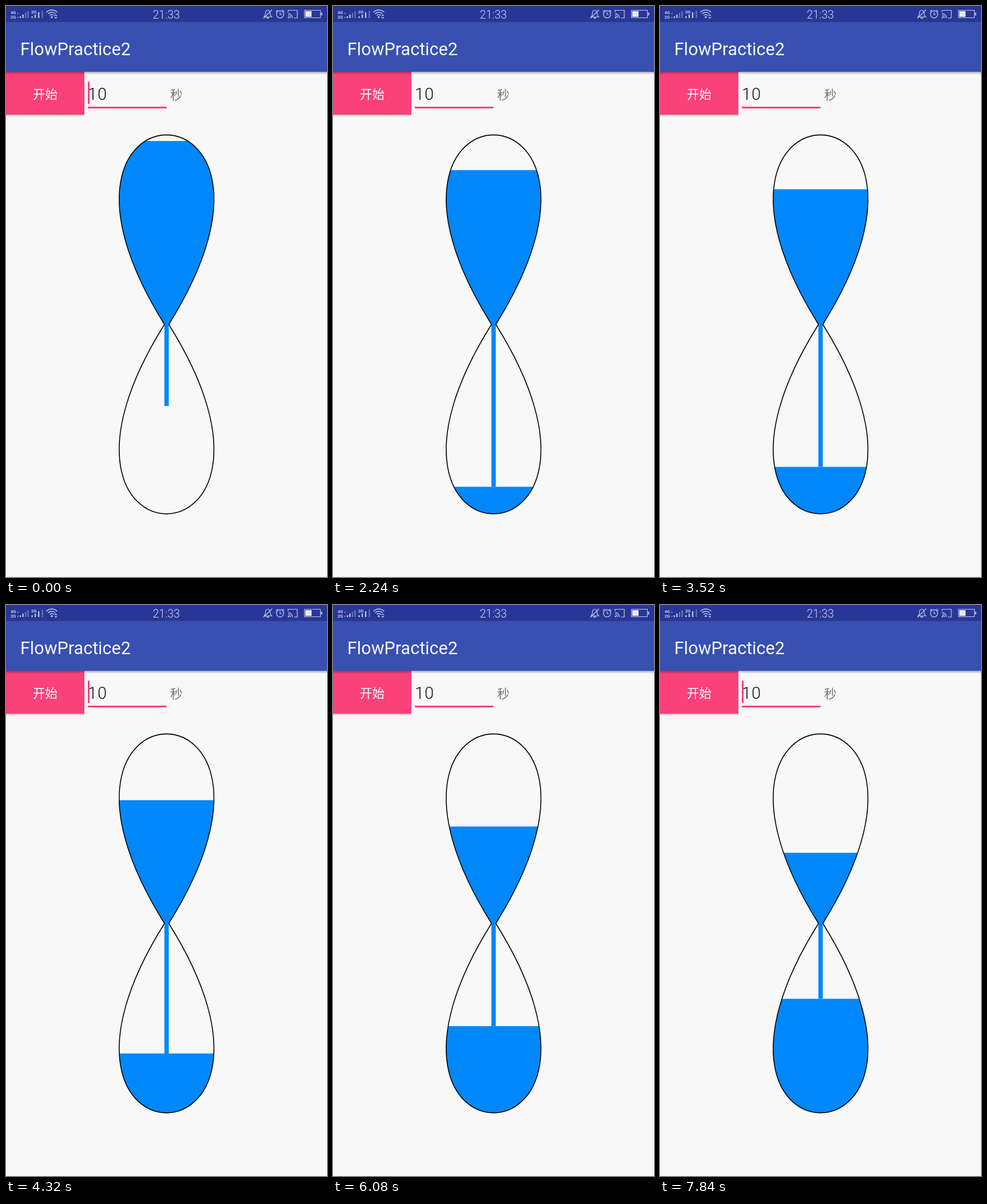
These frames come from a looping animation (561 by 998 pixels, 8 s). An HTML page with a canvas:

```html
<!DOCTYPE html>
<html lang="zh">
<head>
<meta charset="utf-8">
<title>Hourglass</title>
<style>
  html, body { margin: 0; width: 100%; height: 100%; overflow: hidden; background: #f8f8f8; }
  canvas { display: block; width: 561px; height: 998px; }
</style>
</head>
<body>
<canvas id="stage" width="561" height="998"></canvas>
<script>
const ctx = document.getElementById('stage').getContext('2d');
const W = 561, H = 998, LOOP = 8000, STEP = 160;
const TOP = 225.5, NECK = 556.5, FLOOR = 887.5;
const LEFT = 277, RIGHT = 284.5;
const BLUE = '#0088fb', PINK = '#fa417a', ICON = '#c3cae8', DIM = '#6b78ba';
const LATIN = 'Roboto, "Open Sans", sans-serif';
const HAN = '"Noto Sans CJK SC", "Noto Sans CJK", "Noto Sans CJK JP", sans-serif';

function box(x, y, w, h, color) {
  ctx.fillStyle = color;
  ctx.fillRect(x, y, w, h);
}

function text(str, x, y, font, color, spacing = 0) {
  ctx.font = font;
  ctx.fillStyle = color;
  ctx.letterSpacing = spacing + 'px';
  ctx.fillText(str, x, y);
}

function line(points, color = ICON, width = 1.2) {
  ctx.beginPath();
  points.forEach(([x, y]) => ctx.lineTo(x, y));
  ctx.strokeStyle = color;
  ctx.lineWidth = width;
  ctx.stroke();
}

function arc(x, y, r, from, to, width = 1.3) {
  ctx.beginPath();
  ctx.arc(x, y, r, from * Math.PI, to * Math.PI);
  ctx.strokeStyle = ICON;
  ctx.lineWidth = width;
  ctx.stroke();
}

function dot(x, y, r) {
  ctx.beginPath();
  ctx.arc(x, y, r, 0, 2 * Math.PI);
  ctx.fillStyle = ICON;
  ctx.fill();
}

function shade(y, h, w, alpha) {
  const g = ctx.createLinearGradient(0, y, 0, y + h);
  g.addColorStop(0, `rgba(0,0,0,${alpha})`);
  g.addColorStop(1, 'rgba(0,0,0,0)');
  box(0, y, w, h, g);
}

function bars(x, lit) {
  for (let i = 0; i < 4; i++) {
    const h = 3 + i * 3;
    box(x + i * 4.5, 21 - h, 2.2, h, i < lit ? ICON : DIM);
  }
}

function statusBar() {
  box(0, 0, W, 28, '#283796');
  text('4G', 8, 14, `bold 7.5px ${LATIN}`, ICON);
  text('2G', 8, 21.5, `bold 7.5px ${LATIN}`, ICON);
  box(20, 12, 1.5, 1.5, ICON);
  box(20, 19, 1.5, 1.5, ICON);
  bars(24, 2);
  text('2G', 44, 12.5, `bold 7.5px ${LATIN}`, ICON);
  box(44.5, 18, 2.2, 3, ICON);
  box(50, 15, 2.2, 6, ICON);
  box(56, 11, 2.2, 10, ICON);
  box(62.5, 8, 2, 13, DIM);

  // Wi-Fi
  arc(80, 20, 13, 1.24, 1.76, 1.5);
  arc(80, 20, 9, 1.24, 1.76, 1.5);
  arc(80, 20, 5, 1.24, 1.76, 1.5);
  dot(80, 19.5, 1.7);
  line([[85, 17.5], [87, 15.5], [89, 17.5]]);
  line([[85, 19.5], [87, 21.5], [89, 19.5]]);

  text('21:33', 256.5, 21.5, `300 19.5px ${LATIN}`, '#cfd4ee');

  // Muted bell
  ctx.beginPath();
  ctx.moveTo(451, 19);
  ctx.quadraticCurveTo(453.5, 17, 453.5, 12);
  ctx.bezierCurveTo(454, 6, 461, 6, 461.5, 12);
  ctx.quadraticCurveTo(461.5, 17, 464.5, 19);
  ctx.closePath();
  ctx.strokeStyle = ICON;
  ctx.lineWidth = 1.2;
  ctx.stroke();
  arc(457.5, 19.5, 2, 0, 1);
  line([[450, 21.5], [465, 6.5]]);

  // Alarm
  arc(479, 14.5, 6.3, 0, 2);
  line([[479, 10.5], [479, 15], [482, 15]]);
  line([[471.5, 10], [475, 7]]);
  line([[483, 7], [486.5, 10]]);

  // Cast
  line([[493, 11], [493, 7.5], [509, 7.5], [509, 21], [503, 21]]);
  arc(493, 21, 7.5, 1.5, 2);
  arc(493, 21, 4.2, 1.5, 2);
  dot(493.8, 20.2, 1.3);

  // Battery
  ctx.strokeStyle = ICON;
  ctx.lineWidth = 1;
  ctx.strokeRect(521.5, 7.5, 28, 13);
  box(523, 9, 11, 10, '#e4e7f5');
  box(550.5, 11.5, 2, 5, ICON);
}

function controls(cursorOn) {
  box(0, 115, 137, 75, PINK);
  shade(190, 4, 137, 0.22);
  shade(115, 5, W, 0.3);
  box(0, 28, W, 87, '#3850b0');
  text('FlowPractice2', 25, 85.5, `30.5px ${LATIN}`, '#f6f7fb');
  text('开始', 47, 162, `21.5px ${HAN}`, '#fff');
  text('10', 143, 164, `300 29px ${LATIN}`, '#111', 1);
  text('秒', 287, 163, `21.5px ${HAN}`, '#737373');
  box(143, 176, 137.5, 3, PINK);
  if (cursorOn) box(143, 132.5, 3, 38.5, PINK);
}

function bulb(controlY) {
  const path = new Path2D();
  path.moveTo(LEFT, NECK);
  path.bezierCurveTo(0, controlY, W, controlY, RIGHT, NECK);
  return path;
}

const upper = bulb(115), lower = bulb(998);

function fillBulb(path, from, to) {
  ctx.save();
  ctx.clip(path);
  box(0, from, W, to - from, BLUE);
  ctx.restore();
}

function hourglass(run) {
  const fall = Math.min(1, run / 483);
  const topLevel = TOP + run * 0.0331;
  const lowLevel = FLOOR - Math.max(0, run - 483) * 0.0344;
  const streamEnd = Math.min(lowLevel, NECK + (FLOOR - NECK) * fall * fall);

  fillBulb(upper, topLevel, NECK);
  fillBulb(lower, lowLevel, FLOOR + 1);
  box(LEFT - 0.2, NECK - 1, RIGHT - LEFT + 0.2, streamEnd - NECK + 1, BLUE);
  ctx.strokeStyle = '#000';
  ctx.lineWidth = 1.6;
  ctx.stroke(upper);
  ctx.stroke(lower);
}

// Timer milliseconds elapsed at a moment of the loop; it starts more slowly.
function elapsed(t) {
  return t < 1440 ? 317 + t * 0.629 : 1223 + (t - 1440) * 0.789;
}

const start = performance.now();

function draw(now) {
  const t = Math.max(0, now - start) % LOOP;
  const run = elapsed(Math.floor(t / STEP) * STEP);
  box(0, 0, W, H, '#f8f8f8');
  controls(run % 1000 < 500);
  statusBar();
  hourglass(run);
  requestAnimationFrame(draw);
}

draw(start);
</script>
</body>
</html>
```
